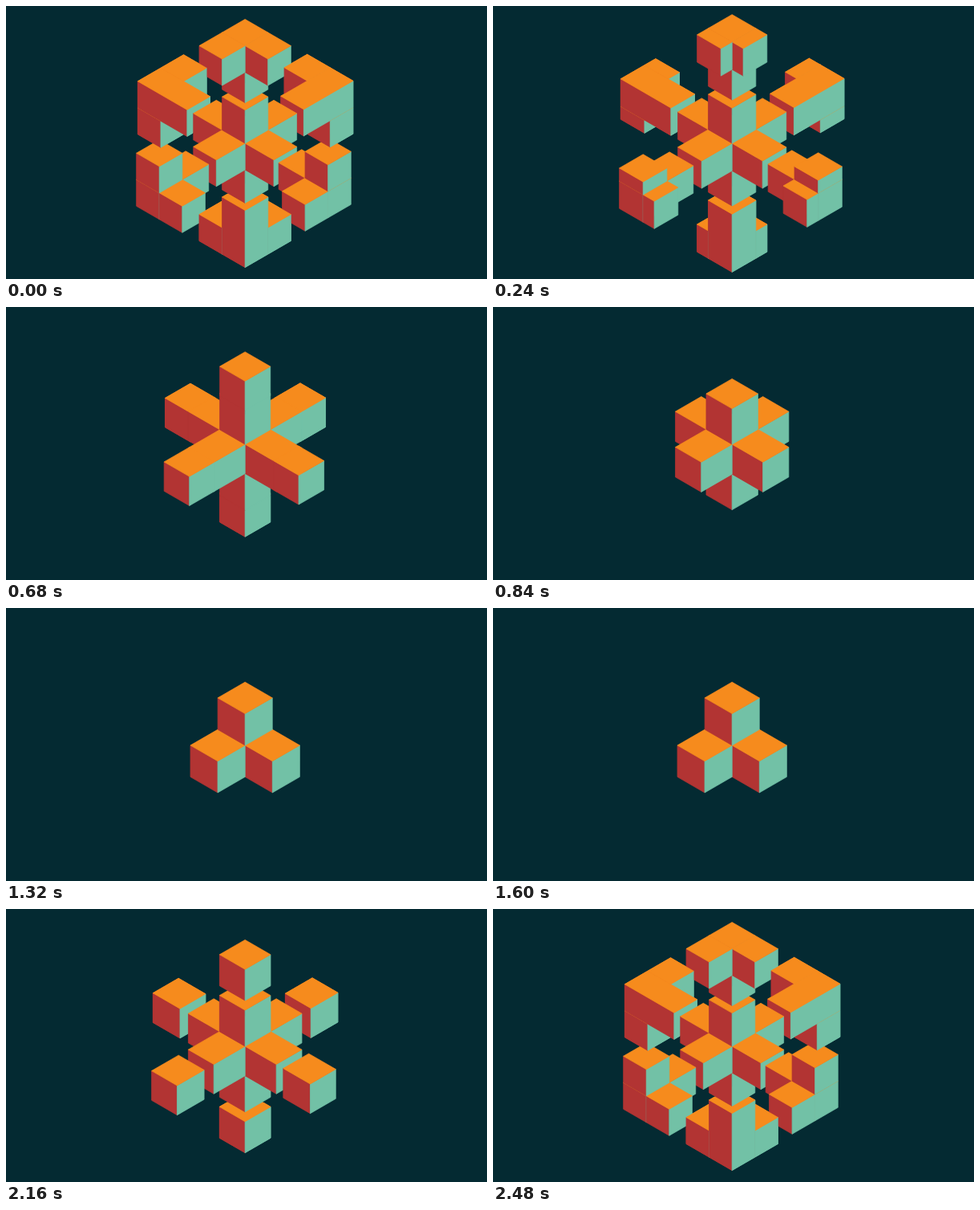
Recreate the animation shown at these times as an HTML page with a canvas. Size 600x340 px, loop 3000 ms.

```html
<!DOCTYPE html>
<html lang="en">
<head>
<meta charset="utf-8">
<title>Isometric cubes</title>
<style>
  html, body { margin: 0; width: 100%; height: 100%; overflow: hidden; background: #042a32; }
  canvas { display: block; width: 600px; height: 340px; }
</style>
</head>
<body>
<canvas id="stage" width="600" height="340"></canvas>
<script>
const ctx = document.getElementById('stage').getContext('2d');
const LOOP = 3000, STEP = 40, REST = 1600;
const CX = 298.2, CY = 171, COS = Math.sqrt(3) / 2;
const BACK = '#042a32', TOP = '#f68b1d', LEFT = '#b23433', RIGHT = '#72c1a6';

// axis 0..2 = x, y, z; nudge shifts the piece outwards
const rearPieces = [{ axis: 2, nudge: 0 }, { axis: 0, nudge: 0 }, { axis: 1, nudge: 1 }];
const frontPieces = [{ axis: 2, nudge: 0 }, { axis: 1, nudge: 2 }, { axis: 0, nudge: -2 }];

const mix = (a, b, p) => a + (b - a) * p;
const ramp = (t, from, to) => Math.min(1, Math.max(0, (t - from) / (to - from)));

// Rises 0..1 while the figure closes and falls back to 0 while it opens.
const closed = (t, closeFrom, closeTo, openFrom, openTo) =>
  t < REST ? ramp(t, closeFrom, closeTo) : 1 - ramp(t, openFrom, openTo);

function stateAt(t) {
  const shrink = closed(t, 0, 1260, 1940, 2480);
  const launch = 1 - closed(t, 400, 840, 2020, 2160) ** 3;
  const wings = 1 - closed(t, 60, 400, 2240, 2440);
  const stretch = 1 - closed(t, 360, 650, 2155, 2245);
  const size = mix(33, 39.3, shrink);
  const front = mix(41.4, 39.4, shrink) + 5 * Math.sin(Math.PI * shrink);
  return {
    size, front, launch,
    rear: front * (1 - closed(t, 840, 1280, 1960, 2050) ** 3),
    gap: 57 * launch - 6.5 * wings,
    length: size + 38 * stretch,
    wing: size * wings
  };
}

function face(color, points) {
  ctx.beginPath();
  for (const [x, y, z] of points) ctx.lineTo(CX + (x - y) * COS, CY + (x + y) / 2 - z);
  ctx.closePath();
  ctx.fillStyle = ctx.strokeStyle = color;
  ctx.fill();
  ctx.stroke();
}

function box([[x0, x1], [y0, y1], [z0, z1]]) {
  if (x1 <= x0 || y1 <= y0 || z1 <= z0) return;
  face(LEFT, [[x0, y1, z0], [x1, y1, z0], [x1, y1, z1], [x0, y1, z1]]);
  face(RIGHT, [[x1, y0, z0], [x1, y1, z0], [x1, y1, z1], [x1, y0, z1]]);
  face(TOP, [[x0, y0, z1], [x1, y0, z1], [x1, y1, z1], [x0, y1, z1]]);
}

// The core cube fills [-size, 0] on each axis; every box starts from its ranges.
function span(size, ranges) {
  const out = [0, 1, 2].map(() => [-size, 0]);
  for (const axis in ranges) out[axis] = ranges[axis];
  return out;
}

function star({ size, front, rear }) {
  for (let a = 0; a < 3; a++) box(span(size, { [a]: [-size - rear, -size] }));
  box(span(size, {}));
  for (let a = 0; a < 3; a++) box(span(size, { [a]: [0, front] }));
}

// A bar along its own axis with two wings at the outer end.
function piece({ axis, nudge }, isFront, { size, front, gap, length, wing, launch }) {
  if (gap + length <= front) return;
  const near = gap + nudge * launch, far = near + length;
  const bar = span(size, { [axis]: isFront ? [near, far] : [-size - far, -size - near] });
  const corner = isFront ? [far - size, far] : [-size - far, -far];
  const reach = isFront ? [0, wing] : [-size - wing, -size];
  const parts = [0, 1, 2].filter(a => a !== axis && wing > 0)
    .map(a => span(size, { [axis]: corner, [a]: reach }));
  (isFront ? [bar, ...parts] : [...parts, bar]).forEach(box);
}

function clipOutside(radius) {
  ctx.beginPath();
  ctx.rect(0, 0, 600, 340);
  for (let k = 0; k < 6; k++) {
    const a = k * Math.PI / 3;
    ctx[k ? 'lineTo' : 'moveTo'](CX + radius * Math.sin(a), CY - radius * Math.cos(a));
  }
  ctx.closePath();
  ctx.clip('evenodd');
}

function draw(t) {
  const s = stateAt(t);
  ctx.fillStyle = BACK;
  ctx.fillRect(0, 0, 600, 340);
  ctx.lineWidth = 0.8;
  ctx.lineJoin = 'round';

  const drawRear = () => rearPieces.forEach(p => piece(p, false, s));
  drawRear();
  star(s);
  frontPieces.forEach(p => piece(p, true, s));

  // Away from the star the rear pieces overlap the front ones.
  ctx.save();
  clipOutside(s.size + s.front + 1);
  drawRear();
  ctx.restore();
}

function tick() {
  const t = performance.now() % LOOP;
  draw(Math.floor(t / STEP) * STEP);
  requestAnimationFrame(tick);
}
tick();
</script>
</body>
</html>
```
